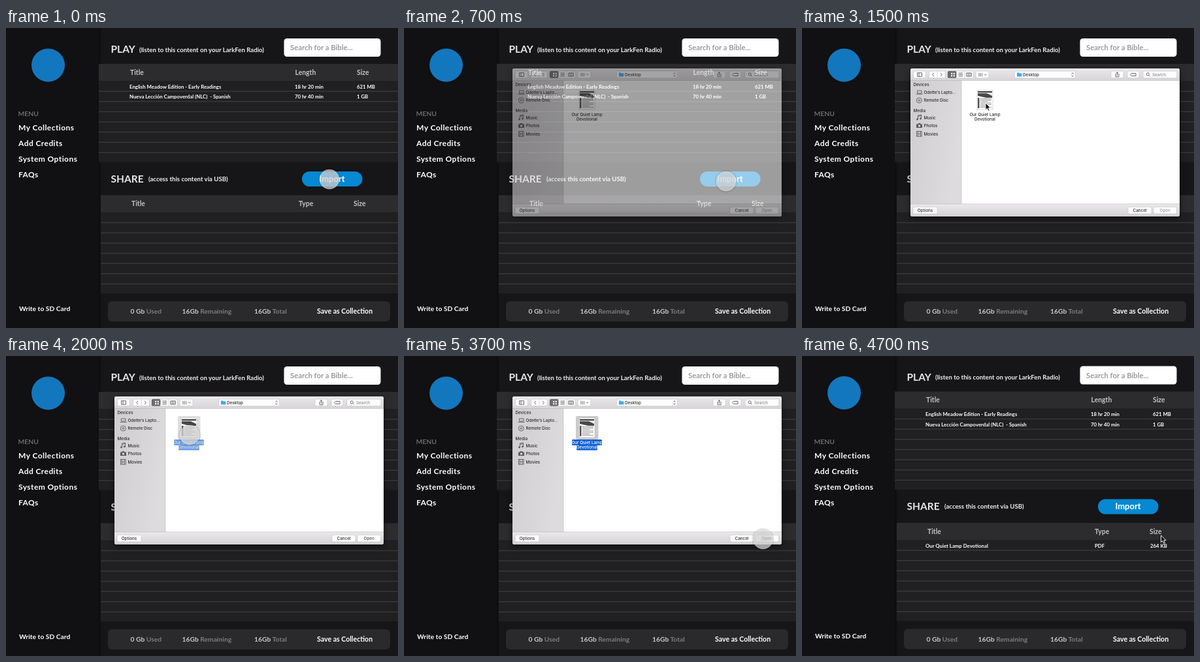
Recreate the animation shown at these times as an HTML page. Size 600 by 460 pixels, loop 4800 ms.

```html
<!DOCTYPE html>
<html lang="en">
<head>
<meta charset="utf-8">
<style>
  html, body { margin: 0; width: 100%; height: 100%; overflow: hidden; background: #161518; }
  svg { display: block; width: 600px; height: 460px; font-family: Lato, "Open Sans", sans-serif; font-weight: 700; fill: #fff; }
  text { white-space: pre; }
  .menu { font-size: 12px; letter-spacing: .43px; }
  .head { font-size: 15.5px; fill: #e6e6e8; }
  .sub { font-size: 9.65px; fill: #f0f0f2; }
  .col { font-size: 10.4px; fill: #c4c4c6; }
  .row { font-size: 7.8px; }
  .stat { font-size: 10.3px; fill: #c9c9cb; }
  .dim { fill: #7c7c7f; }
  #dialog { font: 500 6.3px Inter, Roboto, sans-serif; fill: #2b2b2d; }
  .shadow { filter: drop-shadow(0 3px 5px rgba(0,0,0,.55)); }
  .btn { fill: #fcfcfc; stroke: #c3c1c3; stroke-width: .6; }
  .ico { fill: none; stroke: #5c5b5d; stroke-width: .9; }
  .gray { fill: #8b8a8c; }
  .mid { text-anchor: middle; }
  #touch { filter: drop-shadow(0 .5px 1.5px rgba(0,0,0,.6)); }
</style>
</head>
<body>
<svg id="stage" viewBox="0 0 600 460">
  <defs>
    <linearGradient id="bar" x2="0" y2="1"><stop stop-color="#ebe9eb"/><stop offset="1" stop-color="#d3d1d3"/></linearGradient>
    <linearGradient id="side" x2="1" y2=".4"><stop stop-color="#cfcdcf"/><stop offset="1" stop-color="#dddbdd"/></linearGradient>
    <linearGradient id="edge"><stop stop-color="#0c0b0e"/><stop offset="1" stop-color="#0c0b0e" stop-opacity="0"/></linearGradient>
  </defs>
  <g id="page"></g>
  <g id="dialog"></g>
  <circle id="touch" r="15.3" fill="#fff" fill-opacity=".62"/>
  <path id="arrow" d="M0 0V10.6L2.5 8.3 4.2 12.2 6 11.4 4.4 7.6H7.6Z" fill="#111" stroke="#fff" stroke-width=".9"/>
</svg>
<script>
const $ = id => document.getElementById(id);
const text = (x, y, cls, s) => `<text x="${x}" y="${y}" class="${cls}">${s}</text>`;
const rect = (x, y, w, h, attrs = '') => `<rect x="${x}" y="${y}" width="${w}" height="${h}" ${attrs}/>`;
const path = (d, attrs = 'class="ico"') => `<path d="${d}" ${attrs}/>`;
const btn = (x, y, w, h) => rect(x, y, w, h, 'rx="2" class="btn"');

function table(x, y, cols) {
  let s = rect(x, y, 600 - x, 150.5, 'fill="#201f21"') + rect(x, y, 600 - x, 26, 'fill="#2c2b2d"');
  for (let i = 0; i < 7; i++) s += rect(x, y + 41.3 + i * 15.65, 600 - x, 1.4, 'fill="#3a393b"');
  return s + cols.map(([cx, name]) => text(cx, y + 16.8, 'col', name)).join('');
}

const row = (y, xs, cells) => cells.map((c, i) => text(xs[i], y, 'row', c)).join('');

$('page').innerHTML =
  rect(0, -1, 142, 463, 'fill="#111013"') + rect(142, -1, 5, 463, 'fill="url(#edge)"') +
  '<circle cx="64.5" cy="57" r="25.5" fill="#1377be"/>' +
  `<text x="18.5" y="135" font-size="10.4" font-weight="500" class="dim">MENU</text>` +
  ['My Collections', 'Add Credits', 'System Options', 'FAQs'].map((s, i) => text(19, 157 + i * 24.1, 'menu', s)).join('') +
  '<text x="20" y="433.6" font-size="10.3">Write to SD Card</text>' +
  text(160.5, 38.2, 'head', 'PLAY') + text(204, 36.8, 'sub', '(listen to this content on your LarkFen Radio)') +
  rect(425.5, 16, 148, 28, 'rx="4.5"') +
  '<text x="435" y="34" font-size="11.3" fill="#9b9b9d">Search for a Bible...</text>' +
  table(142, 55, [[190, 'Title'], [442.5, 'Length'], [537, 'Size']]) +
  row(92.8, [189, 442, 537], ['English Meadow Edition - Early Readings', '18 hr 20 min', '621 MB']) +
  row(108, [189, 442, 537], ['Nueva Lección Campoverdal (NLC)  - Spanish', '70 hr 40 min', '1 GB']) +
  text(160.5, 236.6, 'head', 'SHARE') + text(218, 234.6, 'sub', '(access this content via USB)') +
  rect(453, 220, 92.5, 23, 'rx="11.5" fill="#0688d2"') +
  '<text x="499" y="235.7" font-size="13" class="mid">Import</text>' +
  table(145, 256.5, [[192, 'Title'], [448, 'Type'], [532, 'Size']]) +
  `<g id="added">${row(294.2, [189, 448, 533], ['Our Quiet Lamp Devotional', 'PDF', '264 KB'])}</g>` +
  rect(156, 419, 432, 31, 'rx="6" fill="#2a292b"') +
  [[190.5, '0 Gb', 'Used'], [269.5, '16Gb', 'Remaining'], [380, '16Gb', 'Total']].map(([x, n, s]) =>
    text(x, 438, 'stat', `${n} <tspan class="dim">${s}</tspan>`)).join('') +
  '<text x="476" y="438" font-size="10.6">Save as Collection</text>';

// Small document preview
let doc = rect(268, 95.5, 24, 29.5, 'fill="#fff" stroke="#b5b5b5" stroke-width=".5"') +
  rect(269, 97, 22, 2, 'fill="#333"') + path('M269 100h14l8 4v3h-9l-13-3z', 'fill="#4a4a4a"');
for (let i = 0; i < 7; i++)
  doc += rect(273, 108 + i * 2.2, i % 3 == 2 ? 11 : 17, .9, 'fill="#8a8a8a"');
doc += rect(269, 107, 2.5, 16, 'fill="#555"');

const label = text(280, 134.6, 'mid', 'Our Quiet Lamp') + text(280, 142.4, 'mid', 'Devotional');
const grid = [228, 231.6].map(x => rect(x, 68.8, 2.2, 2.2) + rect(x, 72.2, 2.2, 2.2)).join('');

$('dialog').innerHTML =
  rect(166, 62, 412, 227, 'rx="3" fill="#e2e0e2" class="shadow"') +
  rect(166, 62, 412, 22, 'rx="3" fill="url(#bar)"') +
  rect(166, 80, 78, 190, 'fill="url(#side)"') + rect(244, 80, 334, 190, 'fill="#fff"') +
  rect(166, 270, 412, 19, 'rx="3" fill="url(#bar)"') +
  rect(166, 80, 412, .7, 'fill="#b9b7b9"') + rect(166, 269.5, 412, .7, 'fill="#bdbbbd"') + rect(243.6, 80, .7, 190, 'fill="#c2c0c2"') +
  // toolbar
  [[170.5, 19], [194.5, 25], [223, 39.5], [266, 20], [325.5, 93], [473, 19], [498, 18], [522, 52]].map(([x, w]) => btn(x, 66, w, 10.8)).join('') +
  rect(223, 66, 13.5, 10.8, 'rx="2" fill="#6b6a6c"') + `<g fill="#fff">${grid}</g>` +
  path('M176.5 68.7h7v5.6h-7zM179 68.7v5.6') + path('M202 69l-2.5 2.5 2.5 2.5M212 69l2.5 2.5-2.5 2.5') +
  path('M207 66v10.8M249 66v10.8', 'stroke="#c9c7c9" stroke-width=".6"') +
  path('M239.5 69.2h6.5M239.5 71.5h6.5M239.5 73.8h6.5M251.8 69h7.6v5h-7.6zM254.3 69v5M256.9 69v5') +
  path('M270 69.8h6.5M270 71.6h6.5M270 73.4h6.5', 'class="ico" stroke-dasharray="1.6 .8"') + path('M279 70.6l1.6 1.6 1.6-1.6') +
  path('M329 68.5h2.8l.8 1h3.8v5h-7.4z', 'fill="#3fa9e8"') + text(338, 73.7, '', 'Desktop') +
  path('M412.5 70.4l1.5-1.7 1.5 1.7M412.5 72.6l1.5 1.7 1.5-1.7') +
  path('M481 70.5h-1v4.3h5v-4.3h-1M482.5 73v-5M481 69l1.5-1.4 1.5 1.4') +
  path('M502.5 71.5l2-2h6.5v4h-6.5z') +
  '<circle cx="529.3" cy="70.9" r="2" class="ico"/>' + path('M530.8 72.4l1.8 1.9') + text(536, 73.7, 'gray', 'Search') +
  // sidebar
  text(170.5, 89.4, '', 'Devices') + text(170.5, 128.6, '', 'Media') +
  ['Odette\u2019s Lapto...', 'Remote Disc'].map((s, i) => text(186.5, 100.8 + i * 12.4, '', s)).join('') +
  ['Music', 'Photos', 'Movies'].map((s, i) => text(186.5, 139.8 + i * 12.4, '', s)).join('') +
  path('M176.5 96h6.5v4h-6.5zM174.8 101.4h10') +
  '<circle cx="179.3" cy="111" r="4" class="ico"/><circle cx="179.3" cy="111" r="1.3" class="ico"/>' +
  path('M177.5 140v-6l5-1v6M177.5 135.5l5-1') +
  '<g fill="#5c5b5d"><circle cx="176.5" cy="140" r="1.4"/><circle cx="181.5" cy="139" r="1.4"/></g>' +
  path('M175 147.5h2l1-1.4h3l1 1.4h2v5.5h-9z', 'fill="#5c5b5d"') + '<circle cx="179.5" cy="150" r="1.7" fill="#ddd"/>' +
  rect(175.5, 158.5, 7.6, 7.6, 'class="ico"') + path('M177.4 158.5v7.6M181.2 158.5v7.6M177.4 162.3h3.8') +
  // file
  `<g id="plain">${label}</g>` +
  `<g id="picked">${rect(263, 92, 34.5, 36, 'rx="2.5" fill="#cbcbcb"')}
    <g fill="#0f60d6">${rect(257, 128, 46, 9, 'rx="1.5"')}${rect(264, 136, 32, 8.4, 'rx="1.5"')}</g>
    <g fill="#fff">${label}</g></g>` + doc +
  // footer
  [[170, 37], [499, 36], [538, 35.5]].map(([x, w]) => btn(x, 274.3, w, 10.6)).join('') +
  text(188.5, 281.9, 'mid', 'Options') + text(517, 281.9, 'mid', 'Cancel') +
  `<g id="open">${text(555.7, 281.9, 'mid', 'Open')}</g>`;

const LOOP = 4800;
const ramp = (t, a, b) => Math.min(1, Math.max(0, (t - a) / (b - a)));
const show = (id, v) => $(id).setAttribute('opacity', v);

// Pointer tip: time, x, y
const keys = [[100, 495, 226], [450, 493, 229], [1080, 493, 229], [1300, 281, 115], [2620, 281, 115],
  [2800, 543, 264], [3000, 543, 264], [3150, 549.5, 275]];

function pointer(t) {
  let [, x, y] = keys[0];
  for (let i = 1; i < keys.length; i++) {
    const u = ramp(t, keys[i - 1][0], keys[i][0]), e = u * u * (3 - 2 * u);
    x += (keys[i][1] - keys[i - 1][1]) * e;
    y += (keys[i][2] - keys[i - 1][2]) * e;
  }
  return [x, y];
}

function draw(t) {
  const done = t >= 3750;
  show('added', done ? 1 : 0);
  $('page').setAttribute('transform', `translate(0 ${done ? -.5 : 0})`);
  show('dialog', ramp(t, 550, 810) - ramp(t, 3770, 3970));
  const pick = ramp(t, 1850, 2100);
  show('picked', pick);
  show('plain', 1 - pick);
  show('open', .45 + .55 * ramp(t, 1700, 2150));

  const touch = 1 - ramp(t, 850, 1050) + ramp(t, 1500, 1700) - ramp(t, 2100, 2400) +
    ramp(t, 3300, 3500) - ramp(t, 4150, 4450);
  const dip = .2 * (ramp(t, 100, 500) - ramp(t, 550, 800));
  const [x, y] = pointer(t);
  $('touch').setAttribute('transform', `translate(${x} ${y + 6})`);
  $('arrow').setAttribute('transform', `translate(${x} ${y})`);
  show('touch', touch * (1 - dip));
  show('arrow', 1 - touch);
}

function tick() {
  draw(performance.now() % LOOP);
  requestAnimationFrame(tick);
}
tick();
</script>
</body>
</html>
```
